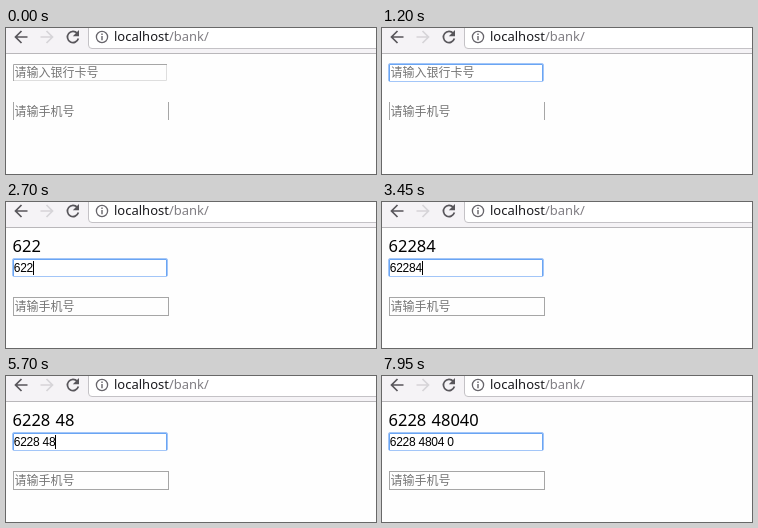
Animation of 370 by 146 pixels, one loop 8000 ms. Source, as an HTML page:

```html
<!DOCTYPE html>
<html lang="zh-CN">
<head>
<meta charset="utf-8">
<title>Bank form</title>
<style>
html, body { margin: 0; width: 100%; height: 100%; overflow: hidden; background: #fff; }
svg { display: block; width: 370px; height: 146px; }
text { white-space: pre; }
.url { font: 13px "Noto Sans", "Open Sans", sans-serif; fill: #1a1a1e; }
.url .path { fill: #807e83; }
.echo { font: 16.5px "Noto Sans", "Open Sans", sans-serif; word-spacing: 1px; fill: #000; }
.value { font: 12px "Liberation Sans", Arial, sans-serif; letter-spacing: -.27px; fill: #000; }
.hint { font: 300 12px "Noto Sans CJK SC", "Noto Sans CJK", sans-serif; fill: #757575; }
.line { fill: none; stroke: #a6a6a6; }
</style>
</head>
<body>
<svg viewBox="0 0 370 146">
  <rect width="370" height="146" fill="#fefefe"/>
  <rect width="370" height="25" fill="#f5f3f6"/>
  <path d="M0 25.5H370" stroke="#b9b7ba"/>
  <path d="M370 -6H86Q82.5 -6 82.5 -2V17Q82.5 20.5 86 20.5H371" fill="#fff" stroke="#c4c2c6"/>
  <g fill="none" stroke-width="1.7">
    <path d="M21.5 9H10M15.5 3L9.5 9L15.5 15" stroke="#58565b"/>
    <path d="M34.5 9H46M40.5 3L46.5 9L40.5 15" stroke="#d6d4d8"/>
    <path d="M71.3 5.3A5.6 5.6 0 1 0 72.4 10.6" stroke="#58565b"/>
  </g>
  <path d="M73 2V8.2H66.8Z" fill="#58565b"/>
  <circle cx="96" cy="9" r="5.6" fill="none" stroke="#66646a" stroke-width="1.3"/>
  <path d="M96 8V12.2M96 5.4V6.9" stroke="#66646a" stroke-width="1.4"/>
  <text class="url" x="108" y="13">localhost<tspan class="path">/bank/</tspan></text>

  <text class="echo" id="echo" x="6.5" y="50"></text>
  <g id="idle">
    <path class="line" d="M7.5 53V36.5H161"/>
    <path d="M8 52.5H160.5V37" fill="none" stroke="#dedede"/>
  </g>
  <g id="focus">
    <rect x="6.5" y="35.5" width="155" height="18" rx="1.5" fill="#fff" stroke="#a3c6f8"/>
    <path d="M7.5 53V36.5H160.5V53" fill="none" stroke="#6aa5f3"/>
  </g>
  <text class="hint" id="hint" x="8.4" y="48.6">请输入银行卡号</text>
  <text class="value" id="value" x="7.8" y="70"></text>
  <rect id="caret" width="1" height="14" fill="#000"/>
  <g id="phone">
    <path class="line" d="M7.5 74V92M162.5 74V92"/>
    <path class="line" id="edges" d="M7 74.5H163M7 92.5H163"/>
    <text class="hint" x="8.4" y="88">请输手机号</text>
  </g>
</svg>
<script>
const LOOP = 8000, SHIFT = 21, DIGIT = 6.4;
// time, heading text, field text
const keys = [
  [0, "", ""],
  [1650, "6", "6"],
  [2400, "62", "62"],
  [2700, "622", "622"],
  [3300, "6228", "6228"],
  [3450, "62284", "62284"],
  [3600, "62284", "6228 4"],
  [3900, "6228 48", "6228 48"],
  [5250, "6228 4", "6228 4"],
  [5700, "6228 48", "6228 48"],
  [6900, "6228 480", "6228 480"],
  [7050, "6228 4804", "6228 4804"],
  [7350, "6228 48040", "6228 4804 0"]
];
// the caret flips at each of these times
const flips = [750, 1200, 1650, 2250, 2400, 3150, 3300, 4500, 4950, 6300, 6750, 7950];
const $ = id => document.getElementById(id);
const show = (id, on) => $(id).setAttribute("visibility", on ? "visible" : "hidden");
const move = (id, y) => $(id).setAttribute("transform", `translate(0 ${y})`);
const caretOn = t => flips.filter(f => f <= t).length % 2 === 1;

// a space is half as wide as a digit
function caretX(s) {
  const spaces = s.split(" ").length - 1;
  return Math.floor(8 + (s.length - spaces / 2) * DIGIT);
}

function draw(t) {
  const [, echo, value] = keys.filter(k => k[0] <= t).pop();
  const typed = value !== "";
  const y = typed ? SHIFT : 0;
  $("echo").textContent = echo;
  $("value").textContent = value;
  show("idle", t < 750);
  show("focus", t >= 750);
  show("hint", !typed);
  show("edges", typed);
  move("focus", y);
  move("phone", y);
  $("caret").setAttribute("x", caretX(value));
  $("caret").setAttribute("y", typed ? 59 : 37);
  show("caret", caretOn(t));
}

const start = performance.now();
function tick() {
  draw((performance.now() - start) % LOOP);
  requestAnimationFrame(tick);
}
draw(0);
requestAnimationFrame(tick);
</script>
</body>
</html>
```
